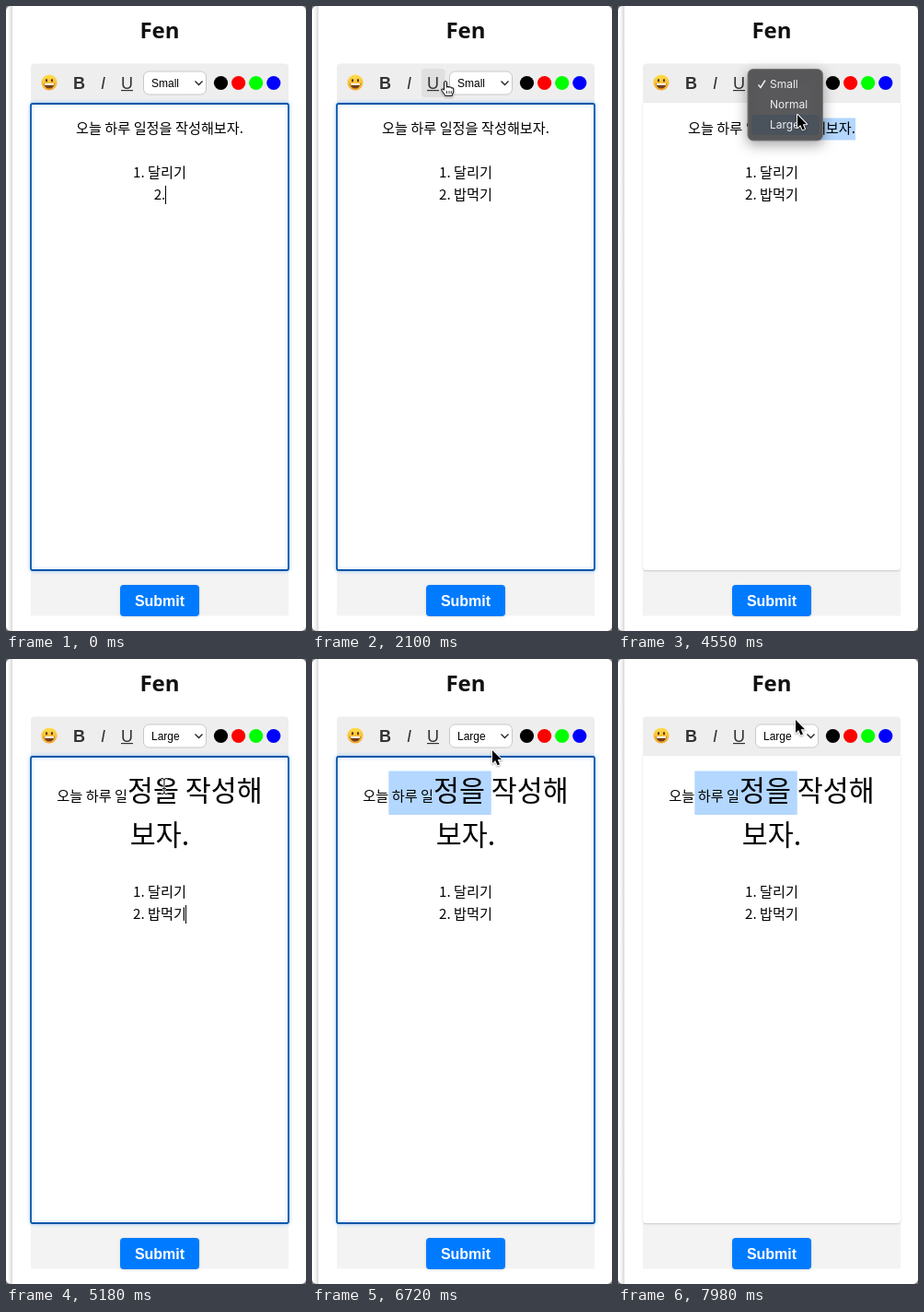
Write an HTML page with a canvas that moves like this. It is 326 by 678 pixels and loops after 8 s.

```html
<!DOCTYPE html>
<html lang="ko">
<head>
<meta charset="utf-8">
<style>
  html, body { margin: 0; width: 100%; height: 100%; overflow: hidden; background: #fff; }
  canvas { display: block; }
</style>
</head>
<body>
<canvas id="stage" width="326" height="678"></canvas>
<script>
const ctx = document.getElementById('stage').getContext('2d');
const LOOP = 8000;
const CENTER = 167;
const SMALL = 15.2, LARGE = 30.4;
const SANS = '"Liberation Sans", Arial, sans-serif';
const koreanFont = size => `${size}px "Noto Sans CJK KR", "Noto Sans CJK", sans-serif`;

// Popup visibility and its vertical offset
const MENUS = [
  { open: 3500, fade: 4620, close: 4830, top: 68.5, checked: 0 },
  { open: 6930, fade: 7700, close: 7960, top: 24.5, checked: 2 },
];
const DRAG_1 = 2870, DRAG_2 = 5950, ENLARGE = 4900;

const TYPING = [
  [0, '2.'], [210, '2. '], [350, '2. ㅂ'], [490, '2. 바'], [560, '2. 밥'],
  [700, '2. 밥ㅁ'], [840, '2. 밥머'], [980, '2. 밥먹'], [1190, '2. 밥먹ㄱ'],
  [1260, '2. 밥먹기'], [1400, '2. 밥먹기 '], [1470, '2. 밥먹기'],
];

// time, x, y of the pointer's hot spot
const POINTER = [
  [1820, 129, 77], [2100, 145, 82], [2400, 146, 92], [2590, 144, 113],
  [2660, 142, 124], [2800, 153, 133], [2940, 154, 133], [3150, 318, 138],
  [3220, 322, 135], [3430, 188, 87], [4060, 188, 89], [4300, 194, 108],
  [4480, 195, 118], [4750, 195, 118], [4900, 193, 122], [5180, 172, 138],
  [5460, 150, 146], [5600, 130, 148], [5800, 66, 150], [5950, 82, 150],
  [6370, 188, 148], [6440, 198, 147], [6580, 200, 125], [6720, 196, 99],
  [6860, 192, 86], [7280, 192, 84], [7500, 193, 66], [8000, 193, 66],
];

function pointerAt(t) {
  const next = POINTER.findIndex(key => key[0] > t);
  if (next < 1) return null;
  const [t0, x0, y0] = POINTER[next - 1], [t1, x1, y1] = POINTER[next];
  const k = (t - t0) / (t1 - t0);
  return { x: x0 + (x1 - x0) * k, y: y0 + (y1 - y0) * k };
}

function rect(x, y, w, h, radius, fill, stroke, lineWidth = 1) {
  ctx.beginPath();
  ctx.roundRect(x, y, w, h, radius);
  if (fill) { ctx.fillStyle = fill; ctx.fill(); }
  if (stroke) { ctx.strokeStyle = stroke; ctx.lineWidth = lineWidth; ctx.stroke(); }
}

function circle(x, y, r, fill) {
  ctx.beginPath();
  ctx.arc(x, y, r, 0, Math.PI * 2);
  ctx.fillStyle = fill;
  ctx.fill();
}

function polyline(points, color, width) {
  ctx.beginPath();
  points.forEach(([x, y]) => ctx.lineTo(x, y));
  ctx.strokeStyle = color;
  ctx.lineWidth = width;
  ctx.stroke();
}

function text(str, x, y, font, color = '#000', align = 'left') {
  ctx.font = font;
  ctx.fillStyle = color;
  ctx.textAlign = align;
  ctx.fillText(str, x, y);
}

function withShadow(color, blur, offsetY, draw) {
  ctx.save();
  ctx.shadowColor = color;
  ctx.shadowBlur = blur;
  ctx.shadowOffsetY = offsetY;
  draw();
  ctx.restore();
}

function runWidth(str, size) {
  ctx.font = koreanFont(size);
  return ctx.measureText(str).width;
}

// Draws centred runs of [string, size]; returns the right end of the line
function textLine(runs, baseline, selection) {
  const total = runs.reduce((sum, [str, size]) => sum + runWidth(str, size), 0);
  let x = CENTER - total / 2;
  const edges = [x];
  for (const [str, size] of runs) {
    for (let i = 1; i <= str.length; i++) edges.push(x + runWidth(str.slice(0, i), size));
    x += runWidth(str, size);
  }
  if (selection) {
    const { start, mouseX, top, height } = selection;
    const end = edges.reduce((best, e) => Math.abs(e - mouseX) < Math.abs(best - mouseX) ? e : best);
    const from = edges[start];
    ctx.fillStyle = '#b3d7ff';
    if (end > from) ctx.fillRect(from, top, end - from, height);
  }
  x = edges[0];
  for (const [str, size] of runs) {
    text(str, x, baseline, koreanFont(size));
    x += runWidth(str, size);
  }
  return x;
}

function drawPage(focused) {
  ctx.fillStyle = '#fff';
  ctx.fillRect(0, 0, 326, 678);
  const edge = ctx.createLinearGradient(2, 0, 7, 0);
  edge.addColorStop(0, '#fff');
  edge.addColorStop(1, '#d9d9d9');
  ctx.fillStyle = edge;
  ctx.fillRect(2, 0, 5, 678);

  text('Fen', CENTER, 35, '600 24px "Noto Sans", sans-serif', '#111', 'center');
  rect(27, 62.5, 280, 44, [4, 4, 0, 0], '#eee');
  rect(27, 612, 280, 49.5, 0, '#f3f3f3');
  if (focused) {
    withShadow('rgba(0,123,255,.3)', 4, 0, () => rect(27, 106, 280, 506, 2, '#fff', '#0b57a8', 1.8));
  } else {
    withShadow('rgba(0,0,0,.18)', 2, 1, () => rect(27, 105, 280, 507, [0, 0, 4, 4], '#fff'));
  }
  withShadow('rgba(0,0,0,.12)', 3, 1, () => rect(124, 628, 86, 34, 4, '#007bff'));
  text('Submit', CENTER, 650.5, `bold 16px ${SANS}`, '#fff', 'center');
}

function drawSmiley(x, y) {
  const shade = ctx.createLinearGradient(0, y - 9, 0, y + 9);
  shade.addColorStop(0, '#ffe04a');
  shade.addColorStop(1, '#f2a42c');
  circle(x, y, 8.6, shade);
  for (const side of [-3, 3]) {
    ctx.beginPath();
    ctx.ellipse(x + side, y - 2.3, 1.1, 1.7, 0, 0, Math.PI * 2);
    ctx.fillStyle = '#5b3413';
    ctx.fill();
  }
  ctx.beginPath();
  ctx.arc(x, y + 1, 5.6, 0, Math.PI);
  ctx.fillStyle = '#74401a';
  ctx.fill();
  ctx.fillStyle = '#fff';
  ctx.fillRect(x - 5, y + 1, 10, 1.8);
}

function drawToolbar(label, hoverUnderline) {
  drawSmiley(47, 83);
  if (hoverUnderline) rect(119, 68, 25.5, 31, 4, '#e0e0e0');
  text('B', 73, 89.5, `bold 18px ${SANS}`, '#333');
  text('I', 103, 89.5, `italic 18px ${SANS}`, '#333');
  text('U', 125, 89.5, `18px ${SANS}`, '#333');
  ctx.fillRect(125, 91, 13, 1.2);
  rect(149.5, 71, 68, 25, 6, '#fff', '#c8c8c8');
  text(label, 158, 87.5, `12px ${SANS}`);
  polyline([[205.5, 81.5], [209.5, 85.5], [213.5, 81.5]], '#222', 1.3);
  ['#000', '#f00', '#0f0', '#00f'].forEach((color, i) => circle(233.5 + i * 19.1, 83.5, 7.6, color));
}

function drawText(t, mouse) {
  const typed = TYPING.findLast(([time]) => time <= t)[1];
  const enlarged = t >= ENLARGE;
  const shift = enlarged ? 72 : 0;
  if (enlarged) {
    const mouseX = t < 6440 ? mouse?.x : 196;
    textLine([['오늘 하루 일', SMALL], ['정을 작성해', LARGE]], 154,
      t >= DRAG_2 && { start: 2, mouseX, top: 121.5, height: 47.5 });
    textLine([['보자.', LARGE]], 202);
  } else {
    const mouseX = t < 3150 ? mouse?.x : 326;
    textLine([['오늘 하루 일정을 작성해보자.', SMALL]], 137.5,
      t >= DRAG_1 && { start: 7, mouseX, top: 121.5, height: 24 });
  }
  textLine([['1. 달리기', SMALL]], 185.5 + shift);
  const end = textLine([[typed, SMALL]], 209.5 + shift);

  const caretOn = t < 1970 || (t >= 2470 && t < DRAG_1) || (t >= ENLARGE && t < 5400);
  if (caretOn) {
    ctx.fillStyle = '#000';
    ctx.fillRect(Math.round(end - 0.5), 195 + shift, 1, 20);
  }
}

function drawMenu(t, menu, mouse) {
  const { open, fade, close, top, checked } = menu;
  if (t < open || t >= close) return;
  ctx.save();
  ctx.globalAlpha = Math.min(1, (close - t) / (close - fade));
  withShadow('rgba(0,0,0,.35)', 14, 4, () => rect(141, top, 81.5, 77.5, 6, '#59595b', '#7c7c7e'));
  const hovered = Math.max(0, Math.min(2, Math.floor((mouse.y - top - 5) / 22)));
  rect(145, top + 5.5 + hovered * 22, 73.5, 22, 4, '#4a525c');
  ['Small', 'Normal', 'Large'].forEach((name, i) => {
    text(name, 165, top + 20.5 + i * 22, '12px Inter, sans-serif', '#eee');
  });
  const y = top + 16 + checked * 22;
  polyline([[152.5, y + 1], [155, y + 4], [160, y - 4]], '#eee', 1.5);
  ctx.restore();
}

const ARROW = new Path2D('M0 0V14L3.2 11L5.6 16.4L8 15.4L5.7 10.2H10Z');
const HAND = new Path2D('M-1.5 1Q0 -2 1.5 1V6Q3 4.5 4 6.2Q5.5 5 6.5 7Q8.7 6.3 8.8 8.5V11L7 15.5H0L-4.2 9.5Q-4.6 7.5-2.5 8L-1.5 9Z');

function drawPointer({ x, y }, shape) {
  ctx.save();
  ctx.translate(x, y);
  ctx.lineJoin = 'round';
  if (shape === 'beam') {
    const half = dir => [[-3.5, dir * 8.5], [-1.5, dir * 8.5], [0, dir * 7], [1.5, dir * 8.5], [3.5, dir * 8.5]];
    for (const [color, width] of [['#fff', 2.6], ['#222', 1.1]]) {
      polyline(half(-1), color, width);
      polyline(half(1), color, width);
      polyline([[0, -7], [0, 7]], color, width);
      polyline([[-2, 2.5], [2, 2.5]], color, width);
    }
  } else {
    const hand = shape === 'hand';
    withShadow('rgba(0,0,0,.35)', 2, 1, () => {
      ctx.fillStyle = ctx.strokeStyle = '#fff';
      ctx.lineWidth = 2;
      ctx.stroke(hand ? HAND : ARROW);
    });
    ctx.fillStyle = hand ? '#fff' : '#000';
    ctx.fill(hand ? HAND : ARROW);
    if (hand) {
      ctx.strokeStyle = '#111';
      ctx.lineWidth = 1.1;
      ctx.stroke(HAND);
      for (const dx of [1.5, 4, 6.3]) polyline([[dx, 10], [dx, 13]], '#111', 0.8);
    }
  }
  ctx.restore();
}

function drawCorners() {
  ctx.beginPath();
  ctx.rect(0, 0, 326, 678);
  ctx.roundRect(0, 0, 326, 678, 5);
  ctx.fillStyle = '#777';
  ctx.fill('evenodd');
}

function render() {
  const t = performance.now() % LOOP;
  const mouse = pointerAt(t);
  const menuOpen = MENUS.some(menu => t >= menu.open && t < menu.close);
  const overUnderline = !!mouse && mouse.y < 101 && mouse.x > 118 && mouse.x < 147;
  const dragging = t >= DRAG_1 && t < 3220;
  const inEditor = !!mouse && mouse.y > 106 && !menuOpen;

  drawPage(t < MENUS[0].open || (t >= ENLARGE && t < MENUS[1].open));
  drawToolbar(t < ENLARGE ? 'Small' : 'Large', overUnderline);
  drawText(t, mouse);
  MENUS.forEach(menu => drawMenu(t, menu, mouse));
  if (mouse) drawPointer(mouse, dragging || inEditor ? 'beam' : overUnderline ? 'hand' : 'arrow');
  drawCorners();
  requestAnimationFrame(render);
}
render();
</script>
</body>
</html>
```
